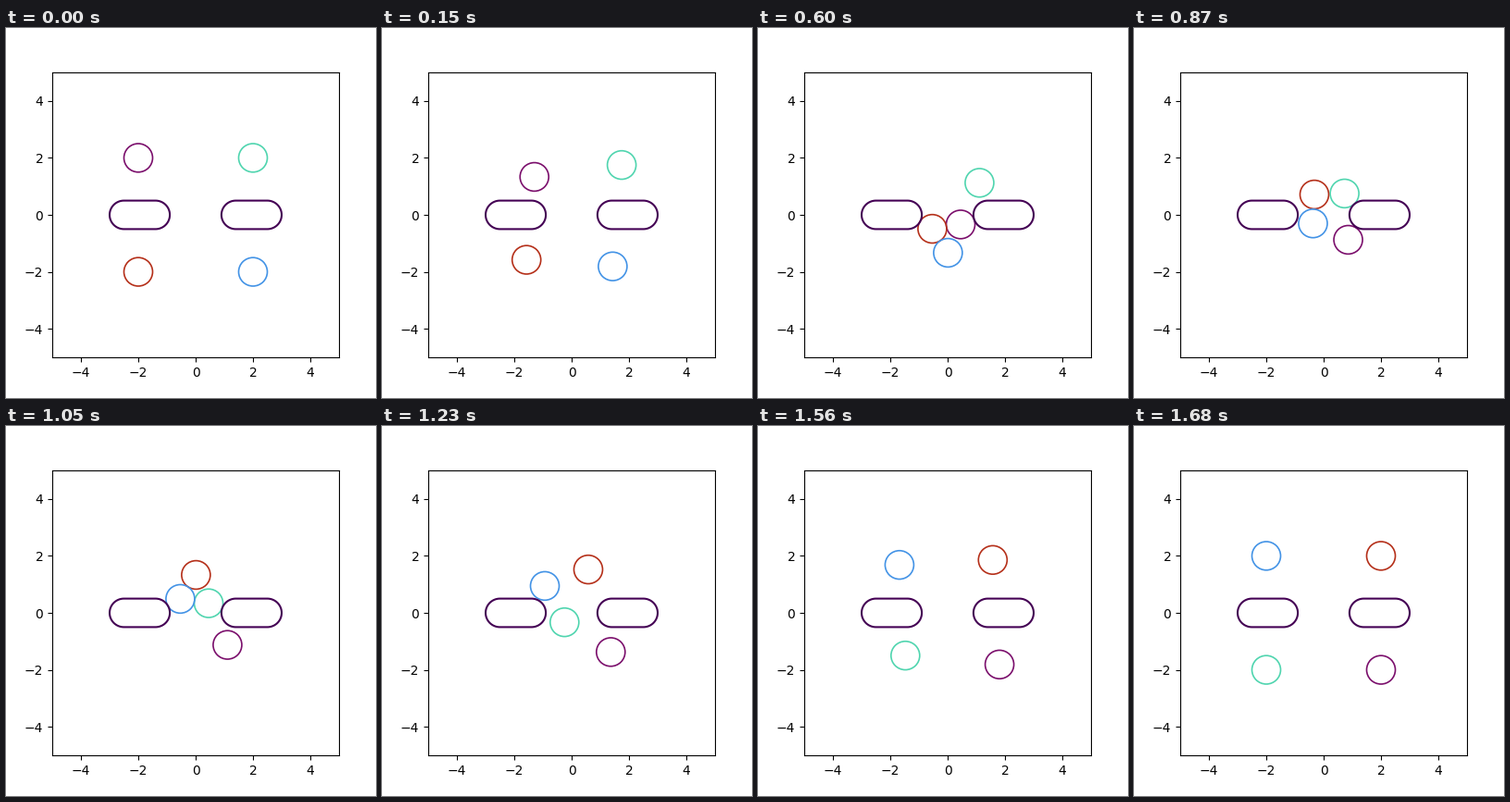
Recreate the animation shown at these times as a matplotlib script. Size 400 by 400 pixels, loop 1710 ms.

```python
import numpy as np
import matplotlib.pyplot as plt
from matplotlib.animation import FuncAnimation
from matplotlib.patches import Circle, Polygon

STEPS = 38
TICKS = 57
RADIUS = 0.5
COLORS = ["#7b0f6c", "#50d5af", "#b5301a", "#4393e6"]


def legs(*keys):
    """Straight legs at constant speed through (step, x, y) keys."""
    k, x, y = np.transpose(keys)
    steps = np.arange(STEPS + 1)
    return np.column_stack([np.interp(steps, k, x), np.interp(steps, k, y)])


def mirrored(path):
    """The same route backwards, reflected in the x axis."""
    return path[::-1] * [1, -1]


def capsule(left, right):
    a = np.linspace(-np.pi / 2, np.pi / 2, 40)
    x = np.r_[right + RADIUS * np.cos(a), left - RADIUS * np.cos(a)]
    y = np.r_[RADIUS * np.sin(a), -RADIUS * np.sin(a)]
    return Polygon(np.column_stack([x, y]), fill=False, ec="#440154",
                   lw=1.5, zorder=2)


# Each disc bends where it touches a wall or another disc.
green = legs((0, 2, 2), (20.7, 0.685, 0.706), (24, 0.453, 0.337),
             (STEPS, -2, -2))
red = legs((0, -2, -2), (10, -0.935, -0.945), (14, -0.535, -0.49),
           (17.3, -0.388, 0.157), (20.7, -0.306, 0.858),
           (24, 0.012, 1.331), (STEPS, 2, 2))
paths = [mirrored(green), green, red, mirrored(red)]

fig, ax = plt.subplots(figsize=(4, 4), dpi=100)
ax.set(xlim=(-5, 5), ylim=(-5, 5))
for wall in [(-2.5, -1.4), (1.4, 2.5)]:
    ax.add_patch(capsule(*wall))
discs = [ax.add_patch(Circle(path[0], RADIUS, fill=False, ec=color, lw=1.2))
         for path, color in zip(paths, COLORS)]


def update(tick):
    step = -(-2 * tick // 3)  # two steps every three ticks
    for disc, path in zip(discs, paths):
        disc.center = tuple(path[step])
    return discs


anim = FuncAnimation(fig, update, frames=TICKS, interval=30,
                     repeat=True, repeat_delay=0)
plt.show()
```
